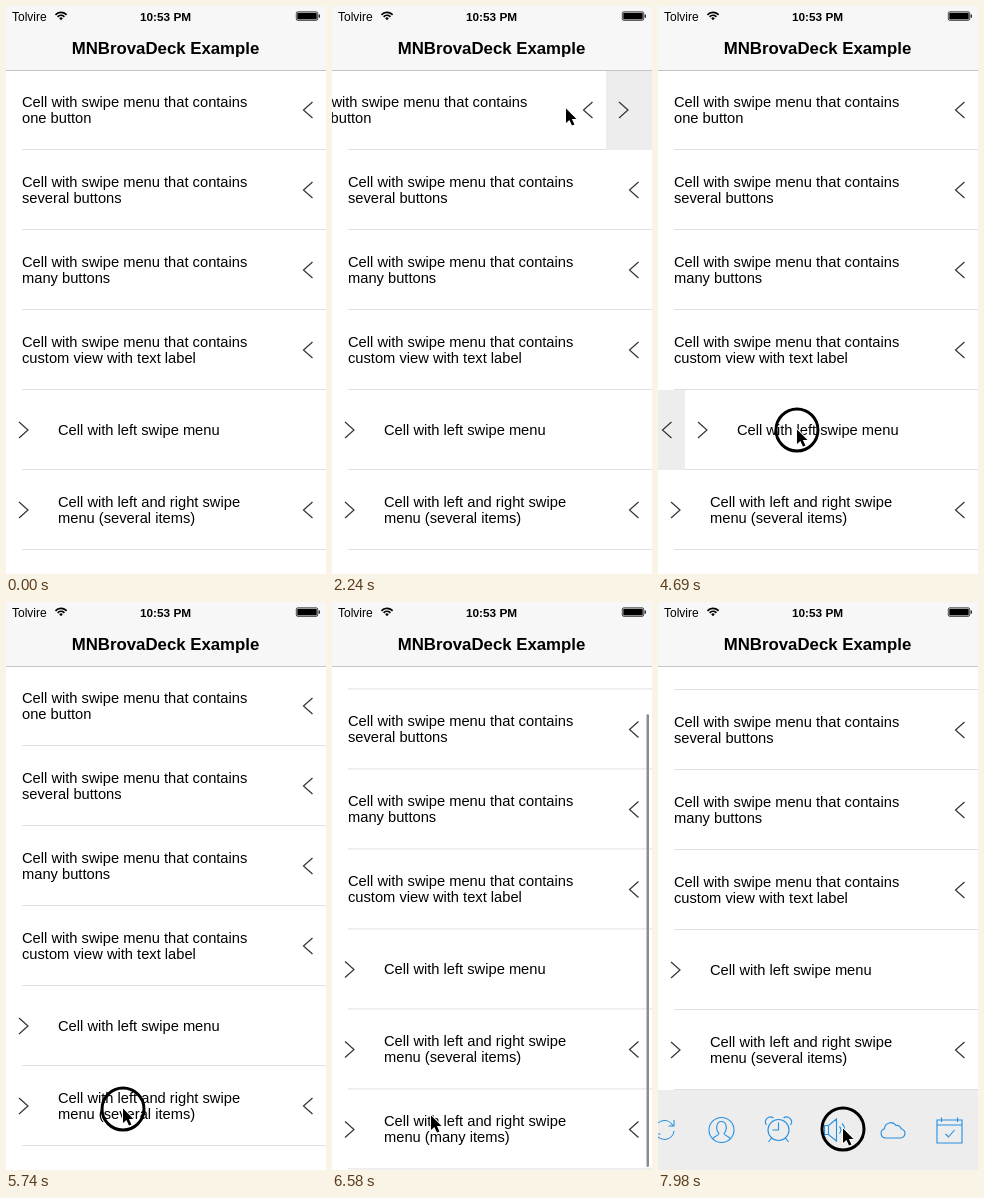
These frames come from a looping animation (320 px wide and 568 px high, 8 s). An HTML page with a canvas:

```html
<!DOCTYPE html>
<html lang="en">
<head>
<meta charset="utf-8">
<title>Swipe menu demo</title>
<style>
  html, body { margin: 0; height: 100%; overflow: hidden; background: #fff; }
  canvas { display: block; width: 100vw; height: 100vh; }
</style>
</head>
<body>
<canvas id="stage" width="320" height="568"></canvas>
<script>
const ctx = document.getElementById('stage').getContext('2d');
const LOOP = 8000, W = 320, H = 568, NAV = 64, ROW = 80, MAX_SCROLL = 56;
const ITEM = 57, HANDLE = 36;
const FONT = '"Liberation Sans", Arial, sans-serif';

// Icons are centred on 0,0.
const disc = r => `M${r} 0A${r} ${r} 0 1 1-${r} 0A${r} ${r} 0 1 1 ${r} 0Z`;
const icon = {
  compass: disc(12.5) + 'M7-7 2.2 2.2-7 7-2.2-2.2ZM-2.2-2.2 2.2 2.2M0-12V-10M0 12V10M-12 0H-10M12 0H10',
  exit: 'M6-5V-12.5H-12V12.5H6V5M-6 0H12M8-4 12 0 8 4',
  refresh: 'M-9.5-1A9.5 9.5 0 0 1 8.5-4M9.5-10V-4H4M9.5 1A9.5 9.5 0 0 1-8.5 4M-9.5 10V4H-4',
  person: disc(12.5) + 'M-8.5 9C-8 5.5-3 6.5-2.5 3.5C-6.5-1-5-8.5 0-8.5S6.5-1 2.5 3.5C3 6.5 8 5.5 8.5 9',
  alarm: disc(10.5) + 'M0-7.5V0H-6M-7 8-10 12M7 8 10 12M-12-5A5 5 0 0 1-5-12M12-5A5 5 0 0 0 5-12',
  speaker: 'M-11-4.5H-7L1-11V11L-7 4.5H-11ZM-7-4.5V4.5M4-3.5A5 5 0 0 1 4 3.5M6.5-6.5A9 9 0 0 1 6.5 6.5',
  cloud: 'M-7 8H7A4.7 4.7 0 0 0 8.5-1.3A4 4 0 0 0 3.5-4.5A6.3 6.3 0 0 0-8-1.2A4.7 4.7 0 0 0-7 8Z',
  calendar: 'M-12.5-10H12.5V13H-12.5ZM-12.5-5H12.5M-8-12.5V-8M8-12.5V-8M-4 4-1 7 5 0'
};
for (const name in icon) icon[name] = new Path2D(icon[name]);

const CHEVRON_LEFT = new Path2D('M4.5-8-4.5 0 4.5 8');
const CHEVRON_RIGHT = new Path2D('M-4.5-8 4.5 0-4.5 8');
const POINTER = new Path2D('M0 0V14.5L3.4 11.4 6 17 8.4 16 5.9 10.5H10.5Z');

const swipeText = 'Cell with swipe menu that contains';
const bothText = 'Cell with left and right swipe';
const several = ['compass', 'exit'];
const many = Object.keys(icon);
const rows = [
  { text: [swipeText, 'one button'], right: ['compass'] },
  { text: [swipeText, 'several buttons'], right: several },
  { text: [swipeText, 'many buttons'], right: many },
  { text: [swipeText, 'custom view with text label'], right: [] },
  { text: ['Cell with left swipe menu'], left: several },
  { text: [bothText, 'menu (several items)'], left: several, right: several },
  { text: [bothText, 'menu (many items)'], left: many, right: many }
];

// Horizontal cell offsets: [time, x]
const swipes = {
  0: [[900, 0], [1300, -93], [1920, -93], [2240, -46], [2500, 0]],
  4: [[2830, 0], [3430, 150], [4330, 150], [4750, 20], [4950, 0]],
  6: [[6860, 0], [7200, -230], [7700, -492]]
};
// Pointer path: [time, x, y]
const pointerPath = [
  [210, 326, 210], [800, 268, 104], [900, 268, 104], [1300, 175, 104], [1700, 187, 104],
  [1920, 187, 103], [2240, 234, 103], [2360, 234, 104], [2750, 123, 421], [2830, 123, 421],
  [3430, 273, 420], [3900, 273, 420], [4200, 262, 424], [4330, 262, 424], [4750, 132, 424],
  [5000, 132, 424], [5500, 117, 506], [5750, 117, 507], [6070, 124, 378], [6180, 124, 378],
  [6580, 99, 514], [6800, 290, 526], [6860, 290, 526], [7200, 60, 528], [7350, 60, 528],
  [7880, 185, 527]
];
const presses = [[860, 1310], [1880, 2235], [2790, 3460], [4290, 4760], [5600, 6080], [6830, 7210], [7900, LOOP]];

const clamp = x => Math.min(1, Math.max(0, x));

function track(keys, t) {
  const next = keys.findIndex(k => k[0] > t);
  if (next === 0) return keys[0].slice(1);
  if (next < 0) return keys[keys.length - 1].slice(1);
  const a = keys[next - 1], b = keys[next];
  const u = (t - a[0]) / (b[0] - a[0]), e = u * u * (3 - 2 * u);
  return a.slice(1).map((v, i) => v + (b[i + 1] - v) * e);
}

function scrollAt(t) {
  if (t > 6090) return MAX_SCROLL + 29 * Math.exp(-(t - 6090) / 125);
  const [finger] = track([[5750, 0], [6070, 128.5]], t);
  return Math.min(finger, MAX_SCROLL) + Math.max(0, finger - MAX_SCROLL) * 0.4;
}

function rect(x, y, w, h, color) {
  ctx.fillStyle = color;
  ctx.fillRect(x, y, w, h);
}

function stroke(path, x, y, color, width) {
  ctx.save();
  ctx.translate(x, y);
  ctx.strokeStyle = color;
  ctx.lineWidth = width;
  ctx.stroke(path);
  ctx.restore();
}

function label(str, x, y, size, weight = 'normal', align = 'left') {
  ctx.font = `${weight} ${size}px ${FONT}`;
  ctx.textAlign = align;
  ctx.fillStyle = '#000';
  ctx.fillText(str, x, y);
}

const chevron = (path, x, y) => stroke(path, x, y, '#333', 1.2);

function drawMenu(items, x, y) {
  items.forEach((name, i) => stroke(icon[name], x + ITEM * (i + 0.5), y, '#2490e3', 1.1));
}

function drawRow(row, y, offset) {
  const mid = y + ROW / 2;
  rect(16, y + 79, W - 16, 1, '#e0e0e2');
  row.text.forEach((line, i) =>
    label(line, offset + (row.left ? 52 : 16), mid + 5 + 16 * (i - (row.text.length - 1) / 2), 14.7));
  if (row.left) chevron(CHEVRON_RIGHT, offset + 17.5, mid);
  if (row.right) chevron(CHEVRON_LEFT, offset + 302, mid);
  if (offset < 0) {
    const edge = W + offset;
    rect(edge, y, W - edge, ROW, '#ededed');
    chevron(CHEVRON_RIGHT, edge + 17.5, mid);
    drawMenu(row.right, edge + HANDLE, mid);
  } else if (offset > 0) {
    rect(0, y, offset, ROW, '#ededed');
    chevron(CHEVRON_LEFT, offset - 18, mid);
    drawMenu(row.left, offset - HANDLE - ITEM * row.left.length, mid);
  }
}

function drawScrollbar(t, scroll) {
  if (t < 5760) return;
  const top = 67 + Math.min(scroll, MAX_SCROLL) * 0.8 + Math.max(0, scroll - MAX_SCROLL);
  ctx.globalAlpha = 1 - clamp((t - 6650) / 250);
  ctx.fillStyle = '#8c8c8c';
  ctx.beginPath();
  ctx.roundRect(314.5, top, 2.5, Math.min(453, 565 - top), 1.25);
  ctx.fill();
  ctx.globalAlpha = 1;
}

function drawHeader() {
  rect(0, 0, W, NAV, '#f7f7f7');
  rect(0, NAV, W, 1, '#c4c4c4');
  label('Tolvire', 6, 14.5, 12);
  label('10:53 PM', 159.5, 14.5, 11.8, 'bold', 'center');
  label('MNBrovaDeck Example', 159.5, 48, 16.8, 'bold', 'center');

  ctx.strokeStyle = '#000';
  ctx.lineWidth = 1.7;
  for (const r of [4.6, 7.6]) {
    ctx.beginPath();
    ctx.arc(55, 14, r, -Math.PI * 0.76, -Math.PI * 0.24);
    ctx.stroke();
  }
  ctx.fillStyle = '#000';
  ctx.beginPath();
  ctx.moveTo(55, 14.3);
  ctx.arc(55, 14, 2.5, -Math.PI * 0.76, -Math.PI * 0.24);
  ctx.fill();

  ctx.lineWidth = 0.7;
  ctx.beginPath();
  ctx.roundRect(290.3, 5.8, 21.4, 8.6, 1.5);
  ctx.stroke();
  rect(291.3, 6.8, 19.4, 6.6, '#000');
  rect(312.6, 8.5, 1.2, 3.2, '#000');
}

function drawPointer(t) {
  if (t < 210) return;
  const [x, y] = track(pointerPath, t);
  if (presses.some(([from, to]) => t >= from && t < to)) {
    ctx.strokeStyle = '#000';
    ctx.lineWidth = 3;
    ctx.beginPath();
    ctx.arc(x, y, 21, 0, Math.PI * 2);
    ctx.stroke();
  }
  ctx.save();
  ctx.translate(x, y - 0.5);
  ctx.lineJoin = 'round';
  ctx.strokeStyle = '#fff';
  ctx.lineWidth = 2;
  ctx.stroke(POINTER);
  ctx.fillStyle = '#000';
  ctx.fill(POINTER);
  ctx.restore();
}

function draw(t) {
  const scroll = scrollAt(t);
  rect(0, 0, W, H, '#fff');
  rows.forEach((row, i) =>
    drawRow(row, NAV + ROW * i - scroll, swipes[i] ? track(swipes[i], t)[0] : 0));
  drawScrollbar(t, scroll);
  drawHeader();
  drawPointer(t);
}

const start = performance.now();
function frame() {
  draw((performance.now() - start) % LOOP);
  requestAnimationFrame(frame);
}
frame();
</script>
</body>
</html>
```
